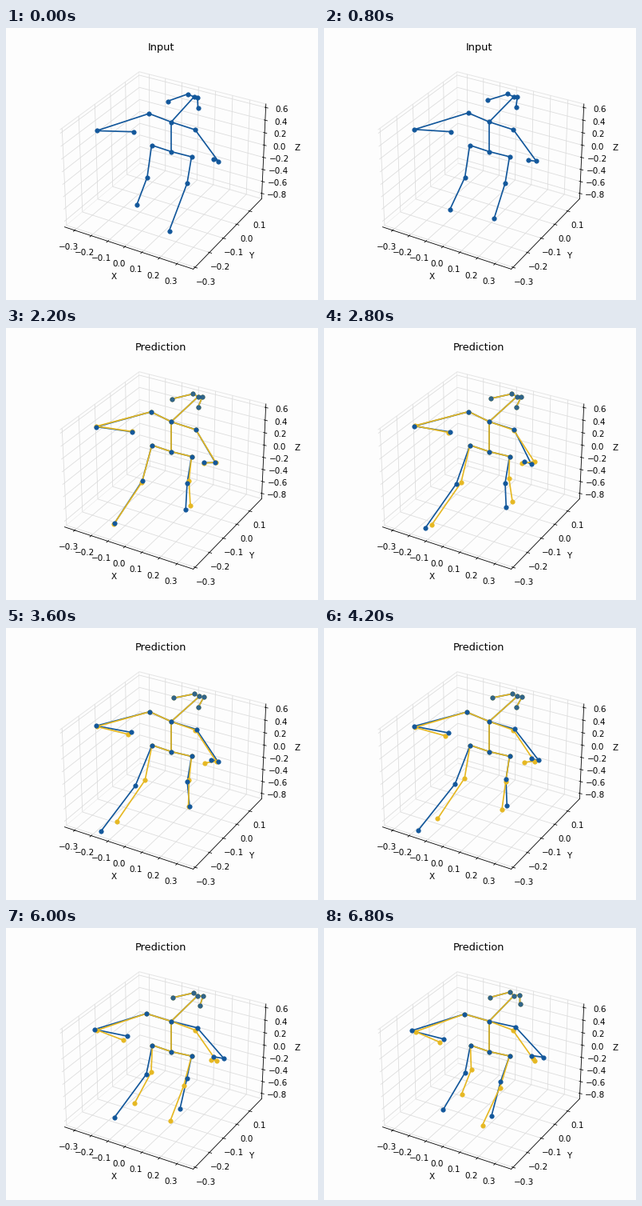
A matplotlib script for the animation above (7000 ms loop, 391x340 px).

```python
import numpy as np
import matplotlib.pyplot as plt
from matplotlib.animation import FuncAnimation

W, H, DPI = 391, 340, 72
FRAMES, STEP = 35, 200
SWITCH = 10  # observed motion before this frame, forecast from here on
STRIDE = 44  # frames in one walking cycle
BLUE, GOLD, PAPER = "#12579b", "#e6b822", "#fdfdfd"

plt.rcParams.update({
    "font.family": "DejaVu Sans",
    "font.size": 10.4,
    "axes.labelpad": 5,
    "grid.color": "#dcdcdc",
    "grid.linewidth": 0.8,
})

BONES = [
    ("root", "neck"), ("neck", "nose"),
    ("nose", "l_eye"), ("l_eye", "l_ear"), ("nose", "r_eye"), ("r_eye", "r_ear"),
    ("neck", "l_shoulder"), ("l_shoulder", "l_elbow"), ("l_elbow", "l_wrist"),
    ("neck", "r_shoulder"), ("r_shoulder", "r_elbow"), ("r_elbow", "r_wrist"),
    ("root", "l_hip"), ("l_hip", "l_knee"), ("l_knee", "l_ankle"),
    ("root", "r_hip"), ("r_hip", "r_knee"), ("r_knee", "r_ankle"),
]
HEAD = ("nose", "l_eye", "r_eye", "l_ear", "r_ear")

t = np.arange(FRAMES)
done = t / (FRAMES - 1)


def swing(center, size, peak):
    return center + size * np.cos(2 * np.pi * (t - peak) / STRIDE)


def ramp(start, change, power=1):
    return start + change * done ** power


def bump(peak, width):
    return np.exp(-((t - peak) / width) ** 2)


def arch(span):
    return np.sin(np.pi * t / span)


def joint(x, y):
    """Path of one joint in stage pixels."""
    return np.column_stack([x + 0 * t, y + 0 * t]) - 0.5


def walker():
    sway, turn = 8.3 * arch(STRIDE), done ** 5
    reach, tuck, bend = bump(10.5, 6.5), bump(14, 4), bump(18, 7.5)
    return {
        "root": joint(207.5, 155),
        "neck": joint(207.5, ramp(118, -1)),
        "nose": joint(236 + 7 * arch(38), ramp(86.7, -1.5)),
        "l_eye": joint(228.5 + sway, 83 - 2.5 * turn),
        "r_eye": joint(240.5 + sway, 87 - 3 * turn),
        "l_ear": joint(203 + sway, 92 - sway / 2 - 2 * turn),
        "r_ear": joint(241 + 5 * turn, 100 - 5 * turn),
        "l_shoulder": joint(swing(179.3, 3, 10), swing(106.6, -1.6, 15)),
        "l_elbow": joint(ramp(114, -4, 4), swing(126.3, -3.5, 17)),
        "l_wrist": joint(ramp(160, -10, 2), ramp(130.2, 9, 4)),
        "r_shoulder": joint(ramp(237.5, 3), ramp(127.7, -3.5, 3)),
        "r_elbow": joint(ramp(266.5, 9, 2) - 8 * tuck, ramp(167, -5, 3) + 3.5 * tuck),
        "r_wrist": joint(261 - 13 * reach, ramp(164, -4, 4) + 5 * reach),
        "l_hip": joint(ramp(183, 1), 147),
        "r_hip": joint(233, ramp(161.5, -1)),
        "l_knee": joint(177.5 - 15 * bend, ramp(187, -6, 2) + 12.5 * bend),
        "l_ankle": joint(swing(141.5, -23.5, 20.5), swing(237.2, 17.5, 19)),
        "r_knee": joint(ramp(227.5, -6, 9) + 3 * bump(26, 5), 194.5 - 8.5 * bump(26, 6.5)),
        "r_ankle": joint(205 + 25.5 * arch(36.5), ramp(221, 14, 8) + 33 * np.exp(-t / 6.5)),
    }


def forecast(true_path, x, y, dx, dy, power=1):
    """Ease from the true path onto a simple drift of its own."""
    lead = t - (SWITCH - 1)
    u = np.clip(lead / (FRAMES - SWITCH), 0, 1) ** power
    s = np.clip(lead / 5, 0, 1)[:, None]
    blend = s * s * (3 - 2 * s)
    return true_path * (1 - blend) + joint(x + dx * u, y + dy * u) * blend


truth = walker()
pred = {
    **truth,
    "l_elbow": forecast(truth["l_elbow"], 114, 122, 1, 8, 1.5),
    "l_wrist": forecast(truth["l_wrist"], 159, 128, -14, 15),
    "r_shoulder": forecast(truth["r_shoulder"], 238.5, 128, -1.5, 0),
    "r_elbow": forecast(truth["r_elbow"], 264, 168, 0, -2),
    "r_wrist": forecast(truth["r_wrist"], 248, 170, 14, -7, 2),
    "l_knee": forecast(truth["l_knee"], 169, 198, 16, -20.5),
    "l_ankle": forecast(truth["l_ankle"], 134, 248, 39, -40, 2),
    "r_knee": forecast(truth["r_knee"], 235, 185, -14, 15),
    "r_ankle": forecast(truth["r_ankle"], 246, 210, -47, 37),
}

fig = plt.figure(figsize=(W / DPI, H / DPI), dpi=DPI, facecolor=PAPER)

# 3D box with its grid
side = 287
box = fig.add_axes([51.8 / W, 20.5 / H, side / W, side / H], projection="3d")
box.set_facecolor("none")
box.set_xticks(np.arange(-3, 4) / 10)
box.set_yticks(np.arange(-3, 2) / 10)
box.set_zticks(np.arange(-4, 4) / 5)
box.set(xlim=(-0.362, 0.391), ylim=(-0.312, 0.195), zlim=(-0.893, 0.655),
        xlabel="X", ylabel="Y", zlabel="Z")
box.tick_params(pad=4)
for axis in (box.xaxis, box.yaxis, box.zaxis):
    axis.set_pane_color((0.992, 0.992, 0.992, 1))
    axis.pane.set_edgecolor("#e6e6e6")

# Flat layer in stage pixels for the figures and the title
stage = fig.add_axes([0, 0, 1, 1], zorder=5)
stage.set(xlim=(0, W), ylim=(H, 0))
stage.axis("off")
title = stage.text(194.3, 28, "", size=12.9, ha="center", va="baseline")


def bones(color, z):
    return stage.plot([], [], color=color, lw=1.7, zorder=z)[0]


def dots(color, z):
    return stage.plot([], [], "o", color=color, ms=5.4, mew=0.7, zorder=z)[0]


true_bones, pred_bones = bones(BLUE, 2), bones(GOLD, 3)
pred_dots, true_dots, head_dots = dots(GOLD, 4), dots(BLUE, 5), dots(BLUE, 5)


def bone_path(pose, n):
    gap = [np.nan, np.nan]
    return np.array([p for a, b in BONES for p in (pose[a][n], pose[b][n], gap)]).T


def dot_path(pose, n, names):
    return np.array([pose[name][n] for name in names]).T


def update(n):
    ahead = n >= SWITCH
    title.set_text("Prediction" if ahead else "Input")
    true_bones.set_data(*bone_path(truth, n))
    true_dots.set_data(*dot_path(truth, n, [j for j in truth if j not in HEAD]))
    head_dots.set_data(*dot_path(truth, n, HEAD))
    head_dots.set_alpha(0.85 if ahead else 1)
    pred_bones.set_data(*bone_path(pred, n))
    pred_dots.set_data(*dot_path(pred, n, pred))
    pred_bones.set_visible(ahead)
    pred_dots.set_visible(ahead)
    return title, true_bones, true_dots, head_dots, pred_bones, pred_dots


anim = FuncAnimation(fig, update, frames=FRAMES, interval=STEP,
                     repeat=True, repeat_delay=0, blit=False)
plt.show()
```
